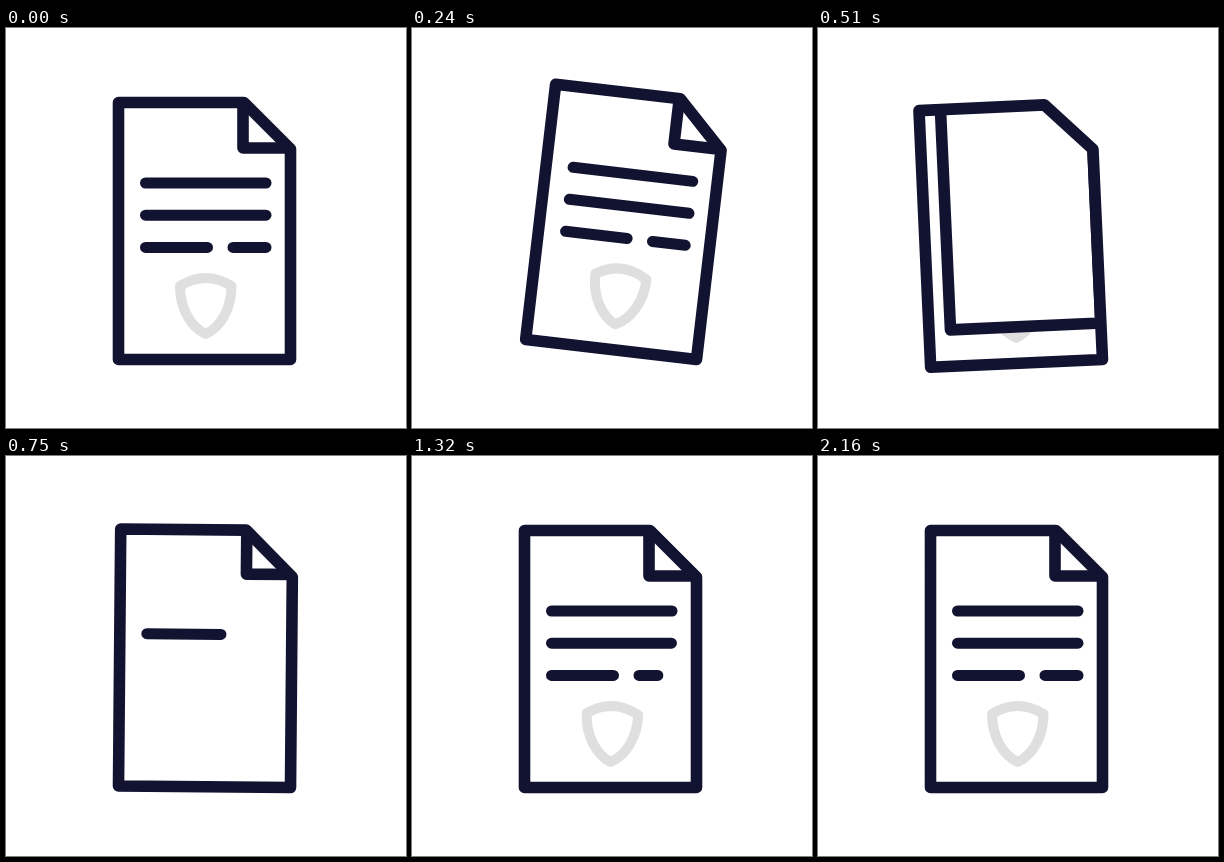
Recreate the animation shown at these times as an HTML page. Size 400 by 400 pixels, loop 2.25 s.

```html
<!DOCTYPE html>
<html lang="en">
<head>
<meta charset="utf-8">
<title>Document icon</title>
<style>
  html, body { margin: 0; width: 100%; height: 100%; overflow: hidden; background: #fff; }
  svg { display: block; width: 100vw; height: 100vh; }
  path { fill: none; stroke: #121331; stroke-width: 11.6; stroke-linecap: round; stroke-linejoin: round; }
  .line { stroke-width: 11; }
  #shield { stroke: #dfdfdf; stroke-width: 10; }
  #fold { fill: #fff; }
</style>
</head>
<body>
<svg viewBox="0 0 400 400">
  <clipPath id="inside"><path d="M112.5 74.5H238L284.5 121V331.5H112.5Z"/></clipPath>
  <g id="doc">
    <path class="line"/>
    <path class="line"/>
    <path class="line"/>
    <path id="shield" d="M174 258Q199.7 242 225.5 258C225.5 280 215 299 199.7 306C184.5 299 174 280 174 258Z"/>
    <g clip-path="url(#inside)"><path id="fold"/></g>
    <path d="M112.5 74.5H238L284.5 121V331.5H112.5Z"/>
  </g>
</svg>
<script>
const LOOP = 2250, STEP = 30, LAST = 2160, TURN = 600;
const $ = id => document.getElementById(id);
const lines = document.querySelectorAll(".line");
const mix = (a, b, p) => a + (b - a) * p;
const span = (t, from, to) => Math.min(1, Math.max(0, (t - from) / (to - from)));
const smooth = p => (1 - Math.cos(Math.PI * p)) / 2;
const easeOut = p => 1 - (1 - p) ** 3;

// Rises from 0 to the first peak, then swings through the rest at even gaps
function swing(t, start, first, gap, peaks) {
  let value = peaks[0] * smooth(span(t, start, first));
  for (let i = 1; i < peaks.length; i++) {
    const from = first + (i - 1) * gap;
    value += (peaks[i] - peaks[i - 1]) * smooth(span(t, from, from + gap));
  }
  return value;
}

// Lines write themselves in turn; the first one also slides up into place
function drawLine(line, i, t, fresh) {
  const start = 570 + 180 * i + 20 * i * i;
  const p = fresh ? easeOut(span(t, start, start + 660)) : 1;
  const drop = fresh && i === 0 ? 32 * (1 - smooth(span(t, 675, 900))) : 0;
  const dashes = i === 2 ? [[139.5, 201.5], [227, 260]] : [[139.5, 260]];
  let left = p * dashes.reduce((sum, [a, b]) => sum + b - a, 0);
  let d = "";
  for (const [a, b] of dashes) {
    if (left <= 0) break;
    d += `M${a} ${155 + 32.2 * i + drop}H${Math.min(b, a + left)}`;
    left -= b - a;
  }
  line.setAttribute("d", d);
}

// The fold wipes the old page away, then a small one opens on the new page
function drawFold(t, fresh) {
  const p = smooth(fresh ? span(t, TURN, 780) : span(t, 270, TURN));
  const x = fresh ? mix(261, 237, p) : mix(237, 112.5, p);
  const y = fresh ? mix(98, 120, p) : mix(120, 331.5, p);
  $("fold").setAttribute("d", `M${x} 74.5V${y}H284.5V74.5`);
}

function drawShield(t, fresh) {
  const turn = fresh ? swing(t, 820, 1030, 560, [10.3, -5.3, 0]) : 0;
  const size = fresh ? swing(t, 820, 1020, 300, [1.13, 1]) : 1;
  $("shield").setAttribute("transform",
    `translate(199.7 277) rotate(${turn}) scale(${size}) translate(-199.7 -277)`);
  $("shield").style.visibility = size > 0 ? "visible" : "hidden";
}

function draw(t) {
  const fresh = t >= TURN;
  const tilt = swing(t, 0, 240, 310, [6.7, -3, 1.85, 0]);
  $("doc").setAttribute("transform", `rotate(${tilt} 284.5 331.5)`);
  lines.forEach((line, i) => drawLine(line, i, t, fresh));
  drawFold(t, fresh);
  drawShield(t, fresh);
}

const begin = performance.now();
function tick() {
  const t = (performance.now() - begin) % LOOP;
  draw(Math.min(LAST, Math.floor(t / STEP) * STEP));
  requestAnimationFrame(tick);
}
tick();
</script>
</body>
</html>
```
